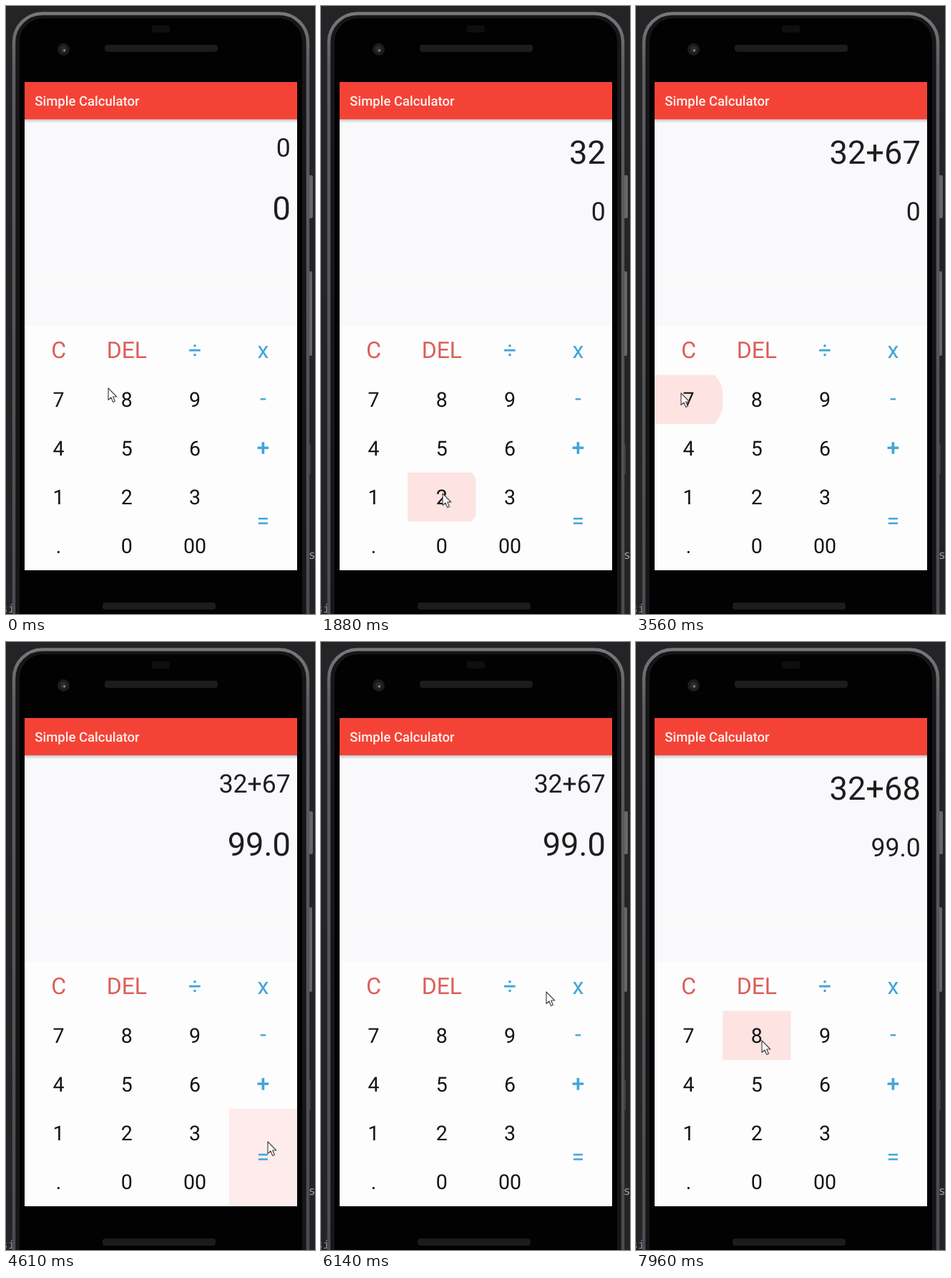
An HTML page that plays this animation: 432x848 px, repeating every 8000 ms.

```html
<!DOCTYPE html>
<html lang="en">
<head>
<meta charset="utf-8">
<title>Calculator demo</title>
<style>
  html, body { margin: 0; width: 100%; height: 100%; overflow: hidden; background: #242427; }
  svg { display: block; width: 100vw; height: 100vh; }
  text { font-family: Roboto, Inter, sans-serif; text-rendering: geometricPrecision; }
  .mono { font-family: "DejaVu Sans Mono", monospace; font-size: 16px; fill: #a0a0a4; }
  .digit { font-size: 28.6px; fill: #141416; }
  .edit { font-size: 32px; fill: #dc5d57; }
  .op { font-size: 32px; fill: #42a5d6; }
  .display { fill: #1e1e20; text-anchor: end; }
  .key { text-anchor: middle; }
</style>
</head>
<body>
<svg viewBox="0 0 432 848" preserveAspectRatio="none">
  <defs>
    <linearGradient id="rim" x1="0" y1="0" x2="0" y2="1">
      <stop offset="0" stop-color="#78787a"/>
      <stop offset=".08" stop-color="#5e5e62"/>
      <stop offset="1" stop-color="#4a4a4e"/>
    </linearGradient>
    <linearGradient id="shade" x1="0" y1="0" x2="0" y2="1">
      <stop offset="0" stop-color="#707078" stop-opacity=".4"/>
      <stop offset="1" stop-color="#707078" stop-opacity="0"/>
    </linearGradient>
    <clipPath id="keyClip"><rect id="keyBox"/></clipPath>
  </defs>

  <rect width="432" height="848" fill="#242427"/>
  <text class="mono" x="-7" y="846" style="fill:#7897a2">si</text>
  <text class="mono" x="423" y="771">s</text>
  <g fill="#68686b">
    <rect x="423" y="236" width="6" height="60" rx="2"/>
    <rect x="423" y="370" width="5" height="118" rx="2"/>
    <rect x="423" y="611" width="3" height="42" fill="#3c3c40"/>
  </g>
  <rect x="11" y="10.5" width="411" height="920" rx="40" fill="#161618" stroke="url(#rim)" stroke-width="4.5"/>
  <rect x="19" y="17" width="395" height="900" rx="33" fill="#020203"/>
  <g fill="#1c1c1f">
    <rect x="138" y="54" width="158" height="10" rx="4"/>
    <rect x="135" y="832" width="158" height="10" rx="4"/>
    <rect x="204" y="27" width="25" height="10" rx="2" fill="#0e0e10"/>
    <circle cx="80.5" cy="60.5" r="8.5"/>
  </g>
  <circle cx="80.5" cy="60.5" r="4.5" fill="#2c2c30"/>
  <circle cx="81.5" cy="62" r="1.4" fill="#9a9a9c"/>

  <rect x="26" y="106" width="381" height="681" fill="#fdfdfe"/>
  <rect x="26" y="158" width="381" height="288" fill="#f9f9fb"/>
  <rect x="26" y="386" width="381" height="1.5" fill="#fbfbee"/>
  <rect x="26" y="158" width="381" height="5" fill="url(#shade)"/>
  <rect x="26" y="106" width="381" height="52" fill="#f44336"/>
  <text x="40.3" y="139" font-size="18.5" font-weight="500" fill="#fff1ef">Simple Calculator</text>

  <circle id="ripple" clip-path="url(#keyClip)" fill="#fde3e1"/>
  <text class="display" id="expression" x="397.8"/>
  <text class="display" id="result" x="397.8"/>
  <g id="keys"></g>
  <path id="cursor" d="M0 0V16.5L3.9 13L6.7 19.5L9.4 18.3L6.7 12H11.8Z"
        fill="#fcfcfd" stroke="#48484a" stroke-width="1.2" stroke-linejoin="round"/>
</svg>
<script>
const LOOP = 8000, STEP = 69.8;
const CELL_W = 95.25, CELL_H = 68.1, LEFT = 26, TOP = 446.5;
const $ = id => document.getElementById(id);

// label: [column, row, style, baseline, rows spanned]
const keys = {
  C: [0, 0, 'edit', 491.3], DEL: [1, 0, 'edit', 491.3],
  '÷': [2, 0, 'op', 491], x: [3, 0, 'op', 491],
  '-': [3, 1, 'op', 558], '+': [3, 2, 'op', 627], '=': [3, 3, 'op', 729, 2]
};
['789', '456', '123'].forEach((row, r) =>
  [...row].forEach((d, c) => keys[d] = [c, r + 1, 'digit', 558.8 + r * CELL_H]));
['.', '0', '00'].forEach((d, c) => keys[d] = [c, 4, 'digit', 763]);

for (const [label, [col, , style, baseline]] of Object.entries(keys)) {
  const t = document.createElementNS('http://www.w3.org/2000/svg', 'text');
  t.setAttribute('class', 'key ' + style);
  t.setAttribute('x', LEFT + (col + .5) * CELL_W);
  t.setAttribute('y', baseline);
  if (label === '+') t.setAttribute('font-weight', 500);
  t.textContent = label;
  $('keys').append(t);
}

// Pointer stops: time, x, y
const path = [
  [0, 143, 533], [250, 143, 533], [1050, 262, 674], [1400, 262, 674],
  [1680, 170, 680], [1880, 170, 680], [2220, 356, 608], [2430, 356, 608],
  [2650, 257, 604], [2960, 257, 604], [3310, 63, 540], [3680, 63, 540],
  [4200, 366, 697], [5350, 366, 697], [6130, 315, 488], [6220, 315, 488],
  [6640, 170, 480], [7060, 170, 480], [7480, 176, 556], [8000, 176, 556]
];
const presses = [
  [1190, '3'], [1720, '2'], [2270, '+'], [2720, '6'],
  [3420, '7'], [4240, '='], [6740, 'DEL'], [7710, '8']
];
// Display states: time, expression, result, whether the result is enlarged
const states = [
  [0, '0', '0', true], [1290, '3', '0'], [1820, '32', '0'], [2370, '32+', '0'],
  [2820, '32+6', '0'], [3490, '32+67', '0'], [4340, '32+67', '99.0', true],
  [6840, '32+6', '99.0'], [7800, '32+68', '99.0']
];

const latest = (list, t) => list.filter(item => item[0] <= t).pop();
const clamp = v => Math.min(1, Math.max(0, v));
const smooth = v => v * v * (3 - 2 * v);
const setAll = (el, attrs) => {
  for (const name in attrs) el.setAttribute(name, attrs[name]);
};

function drawCursor(t) {
  const i = Math.max(1, path.findIndex(p => p[0] > t));
  const [t0, x0, y0] = path[i - 1], [t1, x1, y1] = path[i];
  const k = smooth(clamp((t - t0) / (t1 - t0)));
  $('cursor').setAttribute('transform',
    `translate(${x0 + (x1 - x0) * k} ${y0 + (y1 - y0) * k})`);
}

function drawDisplay(t) {
  const [, expression, result, done] = latest(states, t);
  $('expression').textContent = expression;
  $('result').textContent = result;
  setAll($('expression'), { 'font-size': done ? 35.6 : 45.2, y: done ? 209.5 : 219.5 });
  setAll($('result'), { 'font-size': done ? 45.2 : 35.6, y: done ? 298 : 299 });
}

function drawRipple(t) {
  const press = latest(presses, t);
  const age = press ? t - press[0] : LOOP;
  const [col, row, , , span = 1] = keys[press ? press[1] : 'C'];
  const x = LEFT + col * CELL_W, y = TOP + row * CELL_H, h = CELL_H * span;
  const full = Math.hypot(CELL_W, h) / 2 + 1;
  const grow = clamp(age / 220);
  setAll($('keyBox'), { x, y, width: CELL_W, height: h });
  setAll($('ripple'), {
    cx: x + CELL_W / 2 - 12 * (1 - grow), cy: y + h / 2,
    r: full * (.35 + .65 * Math.sin(grow * Math.PI / 2)),
    opacity: clamp(age / 60 + .3) * clamp((560 - age) / 300)
  });
}

function frame(now) {
  const t = Math.floor(((now % LOOP) + 5) / STEP) * STEP;
  drawCursor(t);
  drawDisplay(t);
  drawRipple(t);
  requestAnimationFrame(frame);
}
frame(performance.now());
</script>
</body>
</html>
```
